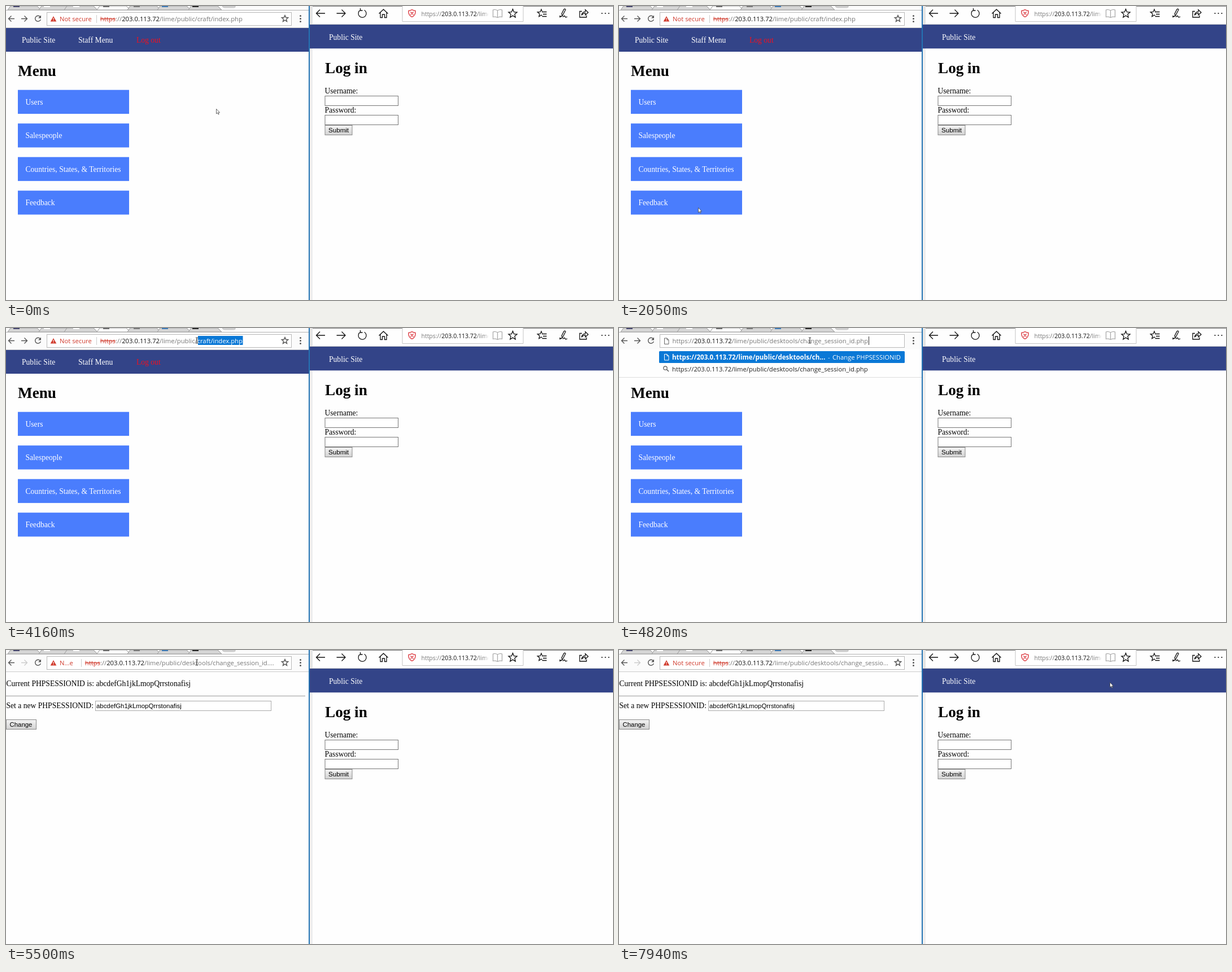
Write an HTML page that moves like this. It is 1075 by 521 pixels and loops after 8000 ms.

```html
<!DOCTYPE html>
<html lang="en">
<head>
<meta charset="utf-8">
<title>Session demo</title>
<style>
  html, body { margin: 0; width: 100%; height: 100%; overflow: hidden; background: #fefefe; }
  svg { display: block; width: 1075px; height: 521px; }
  text { white-space: pre; }
  .serif { font: 13.6px "Liberation Serif", "Times New Roman", serif; }
  .head { font: bold 27.2px "Liberation Serif", "Times New Roman", serif; }
  .sans { font: 11.4px "Liberation Sans", Arial, sans-serif; }
  .ui { font: 11.25px "Open Sans", "Noto Sans", sans-serif; }
  .line { fill: none; stroke: #555; stroke-width: 1.4; }
  .thin { fill: none; stroke: #111; stroke-width: 1.3; }
</style>
</head>
<body>
<svg id="stage" viewBox="0 0 1075 521"></svg>
<script>
const LOOP = 8000;
const HOST = '203.0.113.72';
const MENU_PATH = '/lime/public/craft/index.php';
const TOOL_PATH = '/lime/public/desktools/change_session_id.php';
const SESSION = 'abcdefGh1jkLmopQrrstonafisj';
const NAVY = '#334488', BLUE = '#4a7dfd', PICK = '#0a78d6', RED = '#d0392b', GREY = '#777';

const text = (x, y, s, cls = 'serif', fill = '#000', extra = '') =>
  `<text x="${x}" y="${y}" class="${cls}" fill="${fill}" ${extra}>${s}</text>`;
const rect = (x, y, w, h, fill, stroke = 'none') =>
  `<rect x="${x}" y="${y}" width="${w}" height="${h}" fill="${fill}" stroke="${stroke}"/>`;
const path = (d, cls = 'line', extra = '') => `<path d="${d}" class="${cls}" ${extra}/>`;
const during = (from, to, body) => `<g data-from="${from}" data-to="${to}">${body}</g>`;
const field = (x, y, w, stroke = '#777') => rect(x + .5, y + .5, w - 1, 17, '#fff', stroke);
const button = (x, y, w, label, size) =>
  rect(x + .5, y + .5, w - 1, 17, 'url(#metal)', '#8a8a8a') +
  text(x + 6.5, y + 13, label, 'sans', '#000', `style="font-size:${size}px"`);

function star(cx, cy, r, cls) {
  const points = Array.from({ length: 10 }, (_, i) => {
    const a = i * Math.PI / 5 - Math.PI / 2, q = i % 2 ? r * .45 : r;
    return (cx + q * Math.cos(a)).toFixed(1) + ' ' + (cy + q * Math.sin(a)).toFixed(1);
  });
  return path('M' + points.join('L') + 'Z', cls);
}

// One address line: scheme, host and path in their own tones.
function address(x, y, tail, { scheme = GREY, strike = false, tone } = {}) {
  const part = (s, fill, extra = '') => `<tspan fill="${tone || fill}" ${extra}>${s}</tspan>`;
  return `<text x="${x}" y="${y}" class="ui">` +
    part('https', scheme, strike ? 'text-decoration="line-through"' : '') +
    part('://', GREY) + part(HOST, '#111') + part(tail, GREY) + '</text>';
}

const insecure = (label, bar, tail) =>
  path('M84 18L89.3 27.5H78.7Z', '', `fill="${RED}"`) + rect(83.5, 21, 1.1, 3.3, '#fff') +
  rect(83.5, 25.2, 1.1, 1.1, '#fff') + text(95, 27, label, 'ui', RED) +
  rect(bar, 16, 1, 14, '#ccc') +
  address(bar + 6.8, 27, tail, { scheme: RED, strike: true }) + star(494, 22.5, 6, 'line');

const sheet = (y, stroke) =>
  path(`M80.5 ${y - 5}h4.5l3 3v7.5h-7.5zM85 ${y - 5}v3h3`, '', `fill="none" stroke="${stroke}"`);

function leftTabs() {
  const tab = (x, i) => path(`M${x - 57} 7L${x - 52} 0H${x - 5}L${x + 2} 7Z`, '',
    `fill="${i === 3 ? '#fafafa' : '#d6d6d6'}" stroke="#999"`);
  const marks = [[13, '#44446c'], [67, '#fff'], [119, '#fff'], [172, '#666'], [226, '#777'], [276, '#3b78b5'], [330, '#222']];
  return [60, 115, 160, 218, 272, 325, 380].map(tab).join('') +
    marks.map(([x, c]) => rect(x, 0, 11, 2, c)).join('') +
    path('M383 0H406V2Q405 3 403 3H387Q384 3 383 0Z', '', 'fill="#d6d6d6" stroke="#aaa" stroke-width=".6"') +
    rect(0, 7, 536, 1, '#b5b5b5');
}

const leftToolbar =
  rect(0, 0, 536, 38, '#fbfbfb') + leftTabs() + rect(0, 38, 536, 1, '#ccc') +
  path('M15 22.5H4.5M9.5 17.5L4.5 22.5L9.5 27.5') +
  during(0, 5390, path('M27 22.5H37.5M32.5 17.5L37.5 22.5L32.5 27.5')) +
  during(5390, LOOP, path('M27 22.5H37.5M32.5 17.5L37.5 22.5L32.5 27.5', 'line', 'style="stroke:#ccc"')) +
  path('M60.5 19A5 5 0 1 0 61.4 24') + path('M62 16.5V21.5H57Z', '', 'fill="#555"') +
  rect(72.5, 11.5, 433, 23, '#fff', '#b8b8b8') +
  [17.5, 22.5, 27.5].map(y => `<circle cx="521.5" cy="${y}" r="1.5" fill="#555"/>`).join('');

const menuPage =
  rect(0, 39, 537, 42, NAVY) +
  text(28, 65.3, 'Public Site', 'serif', '#fff') + text(128, 65.3, 'Staff Menu', 'serif', '#fff') +
  text(231, 65.3, 'Log out', 'serif', '#f01020') + text(21, 124.3, 'Menu', 'head') +
  ['Users', 'Salespeople', 'Countries, States, &amp; Territories', 'Feedback'].map((label, i) => {
    const y = 148.7 + i * 59.5;
    return rect(21, y, 197, 42.4, BLUE) + text(34.5, y + 25.8, label, 'serif', '#fff');
  }).join('');

const sessionPage =
  text(.5, 64.3, 'Current PHPSESSIONID is: ' + SESSION) +
  rect(0, 81, 530, 1, '#999') + text(.5, 102.7, 'Set a new PHPSESSIONID:') +
  field(158, 90, 312, '#aaa') + text(160, 102.6, SESSION, 'sans') +
  button(0, 123, 54, 'Change', 11.4);

const suggestions =
  rect(0, 38, 537, 50, '#fefefe') + rect(0, 87, 537, 1, '#ddd') +
  `<rect x="71" y="41" width="435" height="21" rx="1.5" fill="${PICK}"/>` + sheet(51.5, '#fff') +
  text(94, 55.7, `https://${HOST}/lime/public/desktools/ch...`, 'ui', '#fff',
    'style="font-size:11.55px;font-weight:700"') +
  text(370, 55.7, '-', 'ui', '#bfe0ff') + text(378, 55.7, 'Change PHPSESSIONID', 'ui', '#fff') +
  '<circle cx="82" cy="71" r="3.2" class="line" style="stroke-width:1.2"/>' + path('M84.5 73.5L88 77') +
  address(94, 76.7, TOOL_PATH, { tone: '#222' });

const typed = sheet(23, '#666') + address(94.5, 27, TOOL_PATH);

const omnibox =
  during(0, 4820, insecure('Not secure', 160, MENU_PATH)) +
  during(3740, 4820, `<rect id="mark" y="14" height="16" fill="${PICK}"/>` +
    `<g clip-path="url(#marked)">${address(166.8, 27, MENU_PATH, { tone: '#fff' })}</g>`) +
  during(4820, 5260, typed + rect(442, 15, 1, 15, '#333')) +
  during(5260, 5390, typed + star(494, 22.5, 6, 'line')) +
  during(5390, 5670, insecure('N...e', 133, TOOL_PATH.replace(/php$/, '...'))) +
  during(5670, LOOP, insecure('Not secure', 160, TOOL_PATH.replace(/n_id.*$/, '...')));

const rightToolbar =
  rect(538, 0, 537, 33, '#fefefe') + rect(538, 0, 5, 33, '#e4e4e4') + rect(543, 0, 532, 1, '#777') +
  rect(538, 32, 537, 1, '#ccc') +
  path('M565 13H549.5M556 6.5L549.5 13L556 19.5M585.5 13H601M594.5 6.5L601 13L594.5 19.5', 'thin') +
  path('M628 7A7 7 0 1 0 634.5 7.2M627.5 4V8H631.5', 'thin') +
  path('M660.5 13.5L668.5 6L676.5 13.5M663 11.5V20.5H666.5V15H670.5V20.5H674V11.5', 'thin') +
  path('M702 0V27.5H916V0', '', 'fill="#fff" stroke="#c4c4c4"') +
  path('M719 6.5Q722 8.3 725 8.3Q726 16 719 19.5Q712 16 713 8.3Q716 8.3 719 6.5ZM716.5 10.5L721.5 15.5M721.5 10.5L716.5 15.5',
    'thin', 'style="stroke:#d8272f"') +
  `<g clip-path="url(#narrow)"><g style="--s:1" class="edge">${address(735.5, 17.5, '/lime', {})}</g></g>` +
  rect(846, 6, 9, 15, 'url(#fade)') +
  path('M870.5 8Q866 5.5 862.5 7V19.5Q866 18.5 870.5 20.5Q875 18.5 878.5 19.5V7Q875 5.5 870.5 8V20.5', 'thin', 'style="stroke:#aaa"') +
  star(897.5, 13.5, 8, 'thin') + star(948, 13, 7, 'thin') +
  rect(949.5, 9, 9, 12, '#fefefe') + path('M949 10.5H957.5M951 14.5H957.5M949.5 18.5H957.5', 'thin') +
  path('M980 19.5Q987 19 984 14L988 6Q990 4 991 6.5L985.5 17Q982 20 980.5 17M986 19.5Q990 16 990 18.5T994 19', 'thin') +
  path('M1020 9.5H1016V20H1028V16.5M1019.5 16.5Q1020 10.5 1026 10.2V6.5L1031 11.5L1026 16V12.7Q1022 12.5 1019.5 16.5Z', 'thin') +
  [1055.5, 1061.5, 1067.5].map(x => `<circle cx="${x}" cy="13" r="1.1" fill="#111"/>`).join('');

const loginPage =
  rect(538, 75, 5, 446, '#eeeeee') + rect(538, 33, 537, 42.3, NAVY) +
  text(572, 59.8, 'Public Site', 'serif', '#fff') + text(565, 118.8, 'Log in', 'head') +
  text(564.5, 155.3, 'Username:') + field(564.5, 159, 130.5) +
  text(564.5, 189.3, 'Password:') + field(564.5, 193, 130.5) +
  button(564.5, 211, 49, 'Submit', 11.6);

const stage = document.getElementById('stage');
stage.innerHTML = `<defs>
  <linearGradient id="metal" x2="0" y2="1"><stop stop-color="#f4f4f4"/><stop offset="1" stop-color="#d2d2d2"/></linearGradient>
  <linearGradient id="fade"><stop stop-color="#fff" stop-opacity="0"/><stop offset="1" stop-color="#fff"/></linearGradient>
  <clipPath id="narrow"><rect x="730" y="4" width="124.5" height="20"/></clipPath>
  <clipPath id="marked"><rect id="markClip" y="12" height="20"/></clipPath>
  <style>.edge text { font-size: 10.5px; }</style></defs>` +
  rect(0, 0, 1075, 521, '#fefefe') +
  during(0, 5390, menuPage) + during(5390, LOOP, sessionPage) +
  leftToolbar + omnibox + during(4820, 5260, suggestions) +
  rightToolbar + loginPage + rect(536, 0, 2, 521, '#2474b4') +
  path('M.5 .5V9L2.5 7.2L4 10.2L5.2 9.6L3.8 6.8H6.5Z', '', 'id="arrow" fill="#fff" stroke="#444" stroke-width=".8"') +
  path('M-2 -5H-.5L0 -4.5L.5 -5H2M0 -4.5V4.5M-2 5H-.5L0 4.5L.5 5H2', '', 'id="beam" fill="none" stroke="#222"');

// Pointer moves: start, end, then evenly timed stops.
const moves = [
  [0, 0, [[372, 182]]],
  [260, 1270, [[345, 160], [300, 108], [262, 62], [215, 48], [150, 46], [85, 52], [30, 82], [6, 130]]],
  [1400, 2330, [[9, 190], [14, 260], [32, 325], [80, 358], [140, 357], [195, 350], [228, 338], [244, 319]]],
  [2610, 3590, [[358, 137], [385, 85], [408, 52], [424, 38], [426, 23], [421, 22], [417, 22]]],
  [3740, 4160, [[397, 22], [372, 22], [350, 22], [338, 22]]],
  [6070, 7100, [[345, 24], [375, 40], [430, 60], [500, 72], [570, 76], [640, 78], [710, 78], [780, 77], [846, 76]]],
  [7250, 7940, [[700, 95], [575, 170], [590, 240], [700, 225], [810, 140], [869, 57]]]
];

function pointerAt(t) {
  const [start, end, stops] = moves.filter(m => m[0] <= t).pop();
  const gap = (end - start) / (stops.length - 1 || 1) || 1;
  return stops[Math.min(stops.length - 1, Math.floor((t - start) / gap + .001))];
}

const byId = id => document.getElementById(id);
const [arrow, beam, mark, markClip] = ['arrow', 'beam', 'mark', 'markClip'].map(byId);
const timed = [...stage.querySelectorAll('[data-from]')];
const show = (el, on) => { el.style.display = on ? '' : 'none'; };

function render(t) {
  for (const el of timed) show(el, t >= +el.dataset.from && t < +el.dataset.to);
  const [x, y] = pointerAt(t);
  const overText = y < 36 && x > 72 && x < 506;
  show(arrow, !overText);
  show(beam, overText);
  (overText ? beam : arrow).setAttribute('transform', `translate(${x} ${y})`);
  const left = Math.min(x + 2, 419);
  for (const el of [mark, markClip]) {
    el.setAttribute('x', left);
    el.setAttribute('width', 419.5 - left);
  }
}

const began = performance.now();
function tick() {
  render((performance.now() - began) % LOOP);
  requestAnimationFrame(tick);
}
tick();
</script>
</body>
</html>
```
